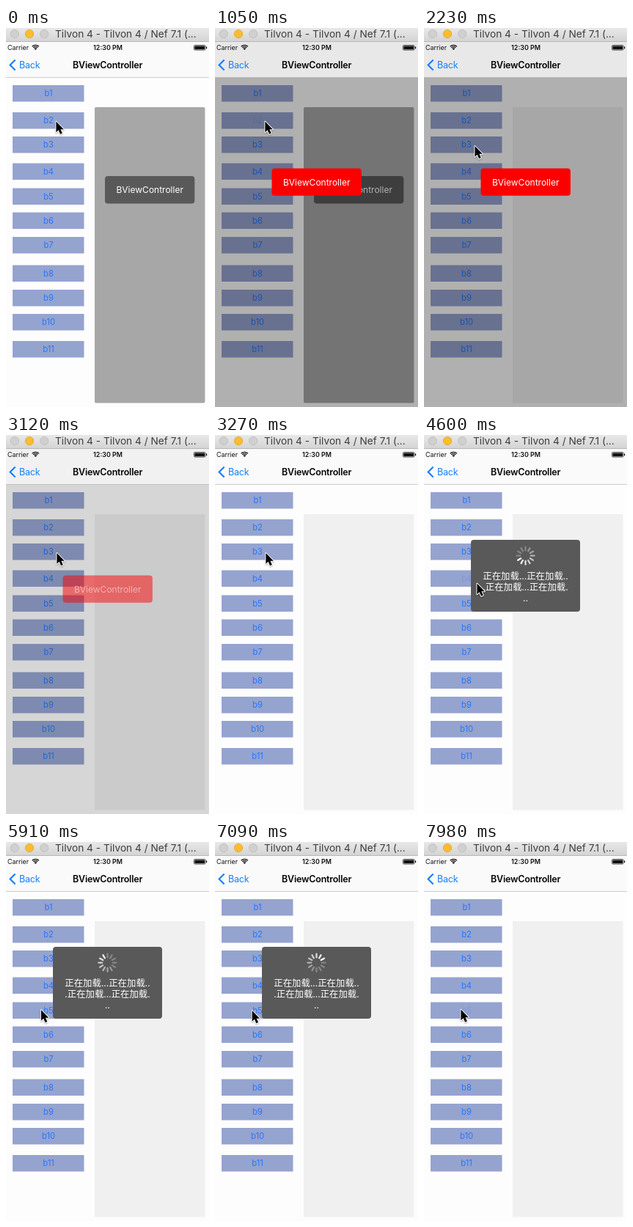
These frames come from a looping animation (277x517 px, 8000 ms). An HTML page with a canvas:

```html
<!DOCTYPE html>
<html lang="en">
<head>
<meta charset="utf-8">
<title>Toast demo</title>
<style>
html, body { margin: 0; width: 100%; height: 100%; overflow: hidden; background: #fdfdfd; }
canvas { display: block; width: 277px; height: 517px; }
</style>
</head>
<body>
<canvas id="stage"></canvas>
<script>
const W = 277, H = 517, LOOP = 8000;
const FIRST = 898, STEP = 147.4; // the screen refreshes in even ticks after a pause
const SANS = 'Inter, "Noto Sans", sans-serif';
const CJK = '"Noto Sans CJK SC", "Noto Sans CJK", "Noto Sans CJK JP", sans-serif';
const BLUE = '#157efb';
const ROWS = [78, 115, 148, 184.5, 218.5, 251.5, 285, 323.5, 357, 390, 427];
const LABEL = 'BViewController';

// [tick, x, y] of the pointer tip
const PATH = [
  [4, 68, 127], [9, 69, 160.5], [16, 69, 160.5], [22, 72, 202], [25, 72, 202],
  [30, 53, 256], [32, 50, 235], [34, 47.5, 228.5], [38, 48, 231], [40, 50.5, 231], [44, 50, 228]
];

const canvas = document.getElementById('stage');
const ctx = canvas.getContext('2d');
const dpr = window.devicePixelRatio || 1;
canvas.width = Math.round(W * dpr);
canvas.height = Math.round(H * dpr);

const clamp = v => Math.max(0, Math.min(1, v));
const smooth = v => v * v * (3 - 2 * v);

function pointerAt(k) {
  if (k <= PATH[0][0]) return PATH[0].slice(1);
  for (let i = 1; i < PATH.length; i++) {
    const [k0, x0, y0] = PATH[i - 1], [k1, x1, y1] = PATH[i];
    if (k <= k1) {
      const p = smooth((k - k0) / (k1 - k0));
      return [x0 + (x1 - x0) * p, y0 + (y1 - y0) * p];
    }
  }
  return PATH[PATH.length - 1].slice(1);
}

function rect(x, y, w, h, color, r = 0) {
  ctx.fillStyle = color;
  ctx.beginPath();
  ctx.roundRect(x, y, w, h, r);
  ctx.fill();
}

function text(str, x, y, size, color, { weight = 400, align = 'center', font = SANS, track = 0 } = {}) {
  ctx.font = `${weight} ${size}px ${font}`;
  ctx.letterSpacing = track + 'px';
  ctx.textAlign = align;
  ctx.fillStyle = color;
  ctx.fillText(str, x, y);
}

function line(points, color, width) {
  ctx.strokeStyle = color;
  ctx.lineWidth = width;
  ctx.beginPath();
  points.forEach(([x, y]) => ctx.lineTo(x, y));
  ctx.stroke();
}

function fade(alpha, draw) {
  if (alpha <= 0) return;
  ctx.save();
  ctx.globalAlpha = alpha;
  draw();
  ctx.restore();
}

function titleBar() {
  const g = ctx.createLinearGradient(0, 0, 0, 19);
  g.addColorStop(0, '#e8e8e8');
  g.addColorStop(1, '#d3d3d3');
  rect(0, 0, W, 19, g);
  rect(0, 18, W, 1, '#b8b8b8');
  [['#d0d0d0', '#b9b9b9'], ['#fdbd2f', '#dfa023'], ['#d0d0d0', '#b9b9b9']].forEach(([fill, edge], i) => {
    ctx.beginPath();
    ctx.arc(11.8 + i * 20.2, 8, 5.6, 0, Math.PI * 2);
    ctx.fillStyle = fill;
    ctx.fill();
    ctx.strokeStyle = edge;
    ctx.lineWidth = 0.8;
    ctx.stroke();
  });
  text('Tilvon 4 - Tilvon 4 / Nef 7.1 (...', 67, 13, 13.7, '#3d3d3d', { align: 'left' });
}

function statusBar() {
  text('Carrier', 2, 30, 8.9, '#111', { align: 'left' });
  text('12:30 PM', 139, 30, 8.9, '#111', { weight: 600 });
  [2.2, 4.4, 6.6].forEach(r => {
    ctx.beginPath();
    ctx.arc(40.3, 30, r, -Math.PI * 0.75, -Math.PI * 0.25);
    ctx.strokeStyle = '#111';
    ctx.lineWidth = 1.3;
    ctx.stroke();
  });
  rect(39.5, 28.5, 1.6, 1.5, '#111', 0.7);
  ctx.beginPath();
  ctx.roundRect(256.5, 23.5, 15.6, 6.6, 1.4);
  ctx.lineWidth = 0.7;
  ctx.stroke();
  rect(257.4, 24.4, 13.8, 4.8, '#111', 0.6);
  rect(273, 25.3, 1.2, 3, '#111', 0.6);
}

function navBar(dim) {
  const shade = Math.round(250 - 18 * dim);
  const edge = Math.round(190 - 22 * dim);
  rect(0, 19, W, 49, `rgb(${shade},${shade},${shade})`);
  rect(0, 67.2, W, 0.8, `rgb(${edge},${edge},${edge})`);
  statusBar();
  line([[12.6, 43.4], [5.6, 50.5], [12.6, 57.6]], BLUE, 2.1);
  text('Back', 18, 55, 12.5, BLUE, { align: 'left', track: -0.2 });
  text(LABEL, 138.6, 55, 12.5, '#050505', { weight: 600, track: -0.22 });
}

function buttons(press) {
  ROWS.forEach((y, i) => {
    rect(9, y, 97.5, 22.4, '#95a3cf');
    fade(press[i + 1] ?? 1, () => text('b' + (i + 1), 58, y + 15.4, 11.2, '#2478fb'));
  });
}

function toast(x, y, color) {
  rect(x, y, 122.4, 37.4, color, 4);
  text(LABEL, x + 61.2, y + 23.2, 12, '#fff');
}

function spinner(cx, cy, head) {
  ctx.lineCap = 'round';
  for (let i = 0; i < 12; i++) {
    const age = (((head - i) % 12) + 12) % 12;
    const a = i * Math.PI / 6;
    const dx = Math.sin(a), dy = -Math.cos(a);
    const glow = 0.27 + 0.7 * Math.max(0, 1 - age / 8);
    line([[cx + dx * 7.3, cy + dy * 7.3], [cx + dx * 12, cy + dy * 12]], `rgba(255,255,255,${glow})`, 2.3);
  }
  ctx.lineCap = 'butt';
}

function loader(scale, head) {
  ctx.translate(138.5, 192);
  ctx.scale(scale, scale);
  ctx.translate(-138.5, -192);
  rect(64, 143, 149, 98, '#595959', 4);
  spinner(138.5, 164.7, head);
  ['正在加载...正在加载..', '.正在加载...正在加载.', '..'].forEach((str, i) =>
    text(str, 138.5, 196.6 + i * 15.3, 12.4, '#fff', { font: CJK }));
}

function pointer(x, y) {
  ctx.save();
  ctx.translate(x, y);
  ctx.beginPath();
  [[0.4, 0.6], [0.4, 15.2], [3.6, 12.2], [6.1, 17.8], [8.8, 16.6], [6.4, 11.2], [10.8, 11.2]]
    .forEach(([px, py]) => ctx.lineTo(px, py));
  ctx.closePath();
  ctx.lineJoin = 'round';
  ctx.shadowColor = 'rgba(0,0,0,.3)';
  ctx.shadowBlur = 2 * dpr;
  ctx.shadowOffsetY = dpr;
  ctx.strokeStyle = '#fff';
  ctx.lineWidth = 2;
  ctx.stroke();
  ctx.shadowColor = 'transparent';
  ctx.fillStyle = '#000';
  ctx.fill();
  ctx.restore();
}

// Label opacity while a tapped button recovers
function tapped(k, from, hold) {
  return k < from ? 1 : clamp(0.2 + 0.4 * Math.max(0, k - from - hold));
}

function draw(t) {
  const k = Math.floor((t - FIRST) / STEP);
  const dim = k < 1 || k > 15 ? 0 : k === 15 ? 0.5 : 1;
  const veil = k < 5 ? 1 : k === 5 ? 0.5 : 0;
  const hud = k < 25 || k > 44 ? 0 : k === 44 ? 0.5 : 1;

  ctx.setTransform(canvas.width / W, 0, 0, canvas.height / H, 0, 0);
  ctx.lineJoin = 'miter';
  rect(0, 0, W, H, '#fdfdfd');
  buttons({ 2: tapped(k, 0, 1), 4: tapped(k, 23, 2), 5: tapped(k, 48, 1) });
  rect(121, 108, 150.5, 403.5, '#f0f0f0');
  fade(veil, () => {
    rect(121, 108, 150.5, 403.5, 'rgba(0,0,0,.305)', 2);
    toast(135, 202, '#595959');
  });
  fade(dim, () => {
    rect(0, 0, W, H, 'rgba(0,0,0,.305)');
    toast(77.5, 191.4, '#fb0000');
  });
  navBar(dim);
  titleBar();
  fade(hud, () => loader(0.8 + 0.2 * hud, 8 + (k - 25) * STEP * 0.012));
  pointer(...pointerAt(k));
}

const start = performance.now();
function tick() {
  draw((performance.now() - start) % LOOP);
  requestAnimationFrame(tick);
}
tick();
</script>
</body>
</html>
```
